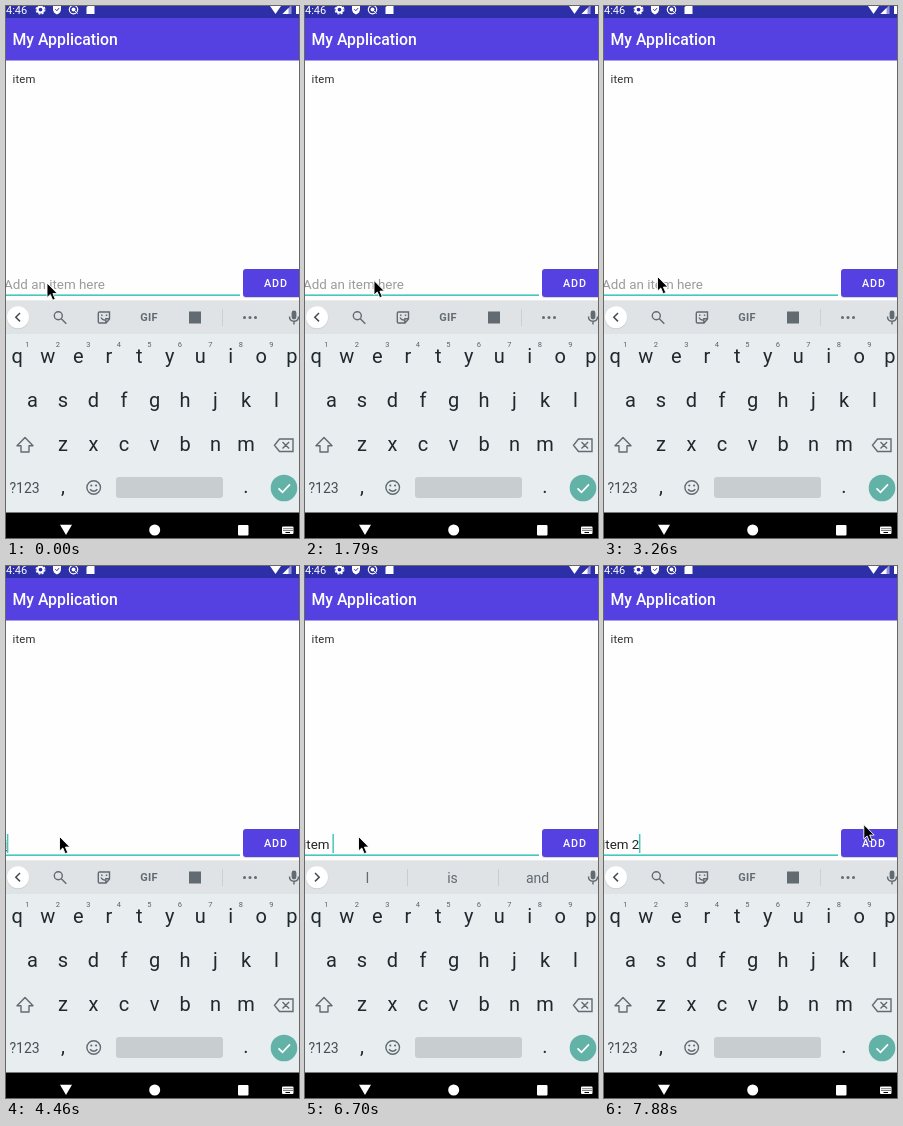
An HTML page that plays this animation: 293 by 532 pixels, repeating every 8 s.

```html
<!DOCTYPE html>
<html lang="en">
<head>
<meta charset="utf-8">
<title>Add item</title>
<style>
html, body { margin: 0; width: 100%; height: 100%; overflow: hidden; background: #fefefe; }
svg { display: block; width: 293px; height: 532px; font-family: Roboto, sans-serif; }
.mid { text-anchor: middle; }
.key { font-size: 20px; fill: #20292e; text-anchor: middle; }
.digit { font-size: 7.5px; fill: #59636a; text-anchor: middle; }
.word { font-size: 14px; fill: #626b71; text-anchor: middle; }
.line { fill: none; stroke: #626b71; stroke-width: 1.4; }
.white { fill: #fff; }
.grey { fill: #626b71; }
</style>
</head>
<body>
<svg viewBox="0 0 293 532">
  <rect width="293" height="532" fill="#fefefe"/>

  <!-- status bar -->
  <rect width="293" height="12" fill="#2d2fa8"/>
  <g class="white">
    <text x="0" y="7.6" font-size="11">4:46</text>
    <circle cx="34.5" cy="3.6" r="2.9" fill="none" stroke="#fff" stroke-width="2"/>
    <circle cx="34.5" cy="3.6" r="4.4" fill="none" stroke="#fff" stroke-width="1.2" stroke-dasharray="2 1.45"/>
    <path d="M47 0h8v3q0 4-4 5.5q-4-1.500-4-5.500z"/>
    <path d="M49.300 3.200l1.500 1.500 2.300-2.600" fill="none" stroke="#2d2fa8"/>
    <circle cx="67.500" cy="3.600" r="4.200" fill="none" stroke="#fff" stroke-width="1.200"/>
    <circle cx="67.500" cy="3.600" r="2"/>
    <path d="M67.500 3.600l4 4" stroke="#fff"/>
    <path d="M80.500 1.500L82.500 -1h6v9h-8z"/>
    <path d="M264 0h11l-5.500 8z"/>
    <path d="M285.500 -1v9h-9z" fill-opacity=".5"/>
    <path d="M282.500 2v6h-6z"/>
    <rect x="290" width="5" height="8"/>
  </g>

  <!-- app -->
  <rect y="12" width="293" height="42.500" fill="#5541e2"/>
  <text class="white" x="6.500" y="39" font-size="15.800" font-weight="500">My Application</text>
  <text x="6.500" y="77" font-size="11.300" letter-spacing=".2" fill="#303030">item</text>
  <text id="hint" x="-2" y="283" font-size="13.400" fill="#9b9b9b">Add an item here</text>
  <text id="typed" x="-2" y="283" font-size="13.400" fill="#262626"></text>
  <rect id="under" x="-2" y="284.200" height="1" fill="#333"/>
  <rect id="caret" y="268" width="1.500" height="19" fill="#45c8bb"/>
  <rect y="288.400" width="234" height="1.600" fill="#45c8bb"/>
  <rect x="237" y="264" width="62" height="28" rx="3" fill="#000" opacity=".16"/>
  <rect x="237" y="263" width="62" height="28" rx="3" fill="#5541e2"/>
  <text class="white mid" x="270" y="281.200" font-size="10.800" font-weight="500" letter-spacing=".9">ADD</text>

  <!-- keyboard -->
  <rect y="294.500" width="293" height="212" fill="#e8edf0"/>
  <rect y="294.500" width="293" height="33.500" fill="#dfe3e6"/>
  <circle cx="12" cy="312" r="11.300" fill="#000" opacity=".08"/>
  <circle class="white" cx="12" cy="311.200" r="11"/>
  <path id="chevron" fill="none" stroke="#444c51" stroke-width="1.500"/>
  <g id="tools">
    <circle class="line" cx="52.300" cy="309.800" r="4"/>
    <path class="line" d="M55.300 312.800l5 5" stroke-width="1.800"/>
    <path class="line" d="M93.500 306h10v7l-3.500 4h-6.500q-1.200 0-1.200-1.200v-8.600q0-1.200 1.200-1.200zM103.500 312.800h-3.700v4M95 311.500q1.500 3 4 2.400"/>
    <path class="line" d="M95.800 308.500v1.400M100.500 308.500v1.400"/>
    <text class="grey mid" x="143" y="315.200" font-size="11" font-weight="700" letter-spacing=".3">GIF</text>
    <rect class="grey" x="183" y="305.500" width="12" height="12"/>
    <path d="M216.500 303v17" stroke="#cbd0d3"/>
    <g class="grey"><circle cx="238.500" cy="311.500" r="1.500"/><circle cx="244" cy="311.500" r="1.500"/><circle cx="249.500" cy="311.500" r="1.500"/></g>
  </g>
  <g id="words">
    <path d="M102.500 303v17M193.500 303v17" stroke="#c8cdd0"/>
    <text class="word" x="62.500" y="316.500"></text>
    <text class="word" x="147.500" y="316.500"></text>
    <text class="word" x="232.500" y="316.500"></text>
  </g>
  <rect class="grey" x="285.600" y="304.500" width="4.800" height="9" rx="2.400"/>
  <path class="line" d="M283.500 310.500q0 4.700 4.500 4.700t4.500-4.700M288 315v3.500"/>
  <g id="keys"></g>
  <path class="line" d="M19 431.500l-8 8.300h4v6.200h8v-6.200h4z" stroke-linejoin="round"/>
  <path class="line" d="M273.500 433h13.500v12.500h-13.500l-5-6.250zM276.500 436l6.600 6.600M283.100 436l-6.600 6.600"/>
  <text x="3.500" y="486.500" font-size="14" fill="#454e54">?123</text>
  <text class="key" x="57" y="487">,</text>
  <circle class="line" cx="87.700" cy="481.500" r="6.800"/>
  <g class="grey"><circle cx="85.300" cy="479.500" r="1.100"/><circle cx="90.100" cy="479.500" r="1.100"/></g>
  <path class="line" d="M84 483.300q3.700 4 7.400 0"/>
  <rect x="110" y="471" width="107" height="21" rx="3" fill="#c8cdd0"/>
  <text class="key" x="240" y="487">.</text>
  <circle cx="278" cy="482" r="13.300" fill="#62b2a8"/>
  <path d="M272.500 482.300l4 4 7.500-8" fill="none" stroke="#fff" stroke-width="1.700"/>

  <!-- navigation bar -->
  <rect y="506.500" width="293" height="25.500"/>
  <g class="white">
    <path d="M54 518.700h12l-6 10.300z"/>
    <circle cx="148.700" cy="524" r="5.500"/>
    <rect x="232" y="519" width="10.500" height="10.500" rx="1"/>
    <rect x="276" y="520.500" width="11.500" height="7.500" rx="1"/>
    <path d="M277.500 522.700h9M277.500 524.500h9" stroke="#000" stroke-dasharray="1 1"/>
    <path d="M279.500 526.500h4.500" stroke="#000"/>
  </g>

  <path id="pointer" d="M0 0V14.600L3.300 11.500 5.700 17.200 8.300 16.100 5.900 10.600H10.400Z" stroke="#fff" stroke-width=".9"/>
</svg>
<script>
const LOOP = 8000;
const $ = id => document.getElementById(id);

// Each table holds [start ms, value]; a value holds until the next start.
const typing = [[0, ''], [4460, 'i'], [5510, 'it'], [5660, 'ite'], [5960, 'item'],
  [6560, 'item '], [6850, 'item 2']];
const caretOn = [[0, false], [4460, true], [5060, false], [5510, true],
  [6410, false], [6560, true], [7440, false], [7880, true]];
const offers = [[0, ''], [4610, 'I in is'], [5660, "it it's its"], [5810, "ite it it's"],
  [5960, 'items item itemized'], [6700, 'I is and'], [6990, '']];
const pointer = [[0, [41, 277]], [1790, [69, 274.5]], [1940, [106, 79.5]], [2090, [86, 138.5]],
  [2380, [72, 215]], [2530, [58, 268]], [2680, [52, 278]], [2830, [51, 275]], [2980, [52, 273]],
  [3110, [53.5, 270.5]], [7440, [92, 278]], [7590, [178, 289.5]], [7740, [243, 272]], [7880, [259.800, 258.500]]];

const at = (table, t) => table.filter(step => step[0] <= t).pop()[1];
const show = (el, on) => el.setAttribute('visibility', on ? 'visible' : 'hidden');

function addText(cls, x, y, text) {
  const el = document.createElementNS('http://www.w3.org/2000/svg', 'text');
  el.setAttribute('class', cls);
  el.setAttribute('x', x);
  el.setAttribute('y', y);
  el.textContent = text;
  $('keys').append(el);
}

[['qwertyuiop', 11.3, 357], ['asdfghjkl', 26.5, 400.5], ['zxcvbnm', 57, 444.500]].forEach(([row, x0, y], r) =>
  [...row].forEach((letter, i) => {
    const x = x0 + i * 30.500;
    addText('key', x, y, letter);
    if (!r) addText('digit', x + 10, y - 16, (i + 1) % 10);
  }));

const wordSlots = $('words').querySelectorAll('text');

function draw(t) {
  const text = at(typing, t);
  const typed = $('typed');
  typed.textContent = text.replace(/ /g, '\u00a0');
  const width = text ? typed.getComputedTextLength() : 0;
  show($('hint'), !text);
  $('caret').setAttribute('x', width - 2.4);
  show($('caret'), at(caretOn, t));
  $('under').setAttribute('width', width);
  show($('under'), text && !text.includes(' '));

  const offer = at(offers, t);
  show($('tools'), !offer);
  show($('words'), offer);
  offer.split(' ').forEach((word, i) => wordSlots[i].textContent = word);
  $('chevron').setAttribute('d', offer ? 'M10 307l4.200 4.200-4.200 4.200' : 'M14 307l-4.200 4.200 4.200 4.200');

  $('pointer').setAttribute('transform', `translate(${at(pointer, t)})`);
}

const start = performance.now();
function tick() {
  draw((performance.now() - start) % LOOP);
  requestAnimationFrame(tick);
}
tick();
</script>
</body>
</html>
```
